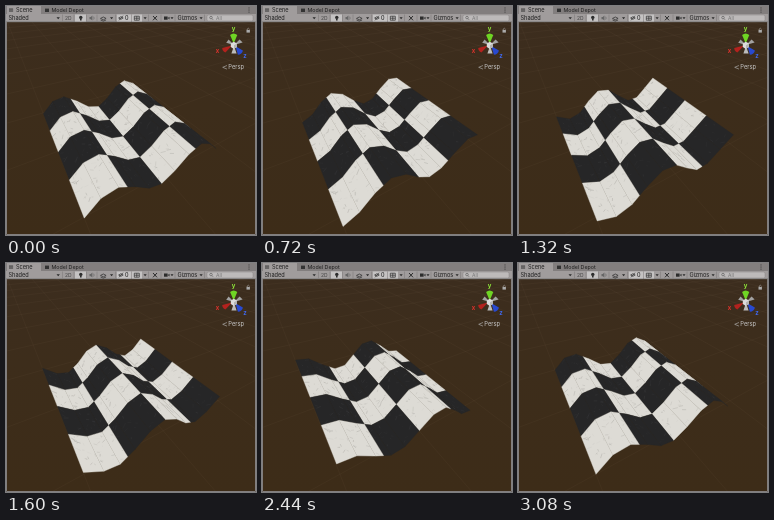
An HTML page with a canvas that plays this animation: 250 by 229 pixels, repeating every 3.12 s.

```html
<!DOCTYPE html>
<html lang="en">
<head>
<meta charset="utf-8">
<title>Scene view wave</title>
<style>
  html, body { margin: 0; width: 100%; height: 100%; overflow: hidden; background: #3d2d1a; }
  canvas, svg { position: absolute; left: 0; top: 0; width: 250px; height: 229px; display: block; }
  text { font: 5.6px Inter, Roboto, "Liberation Sans", sans-serif; fill: #1d1d1d; }
  .axis { font-weight: 700; font-size: 6px; text-anchor: middle; }
</style>
</head>
<body>
<canvas id="view"></canvas>
<svg viewBox="0 0 250 229">
  <!-- tabs -->
  <rect width="250" height="8" fill="#827e7e"/>
  <rect x="1" width="34" height="8" fill="#a09c9c"/>
  <path d="M4 2.2V6M6 2.2V6M3 3.1H7.2M3 5H7.2" stroke="#333" stroke-width=".6"/>
  <text x="10" y="6">Scene</text>
  <rect x="39" y="2.6" width="4" height="3.4" fill="#333"/>
  <text x="45.5" y="6" style="font-size:5.3px">Model Depot</text>
  <path d="M243 1.5v.9M243 3.6v.9M243 5.7v.9" stroke="#333"/>

  <!-- toolbar -->
  <rect y="8" width="250" height="8" fill="#a09c9c"/>
  <rect y="15.5" width="250" height=".7" fill="#777"/>
  <g fill="#c4c2c2">
    <rect x="69" y="8.5" width="11" height="7"/>
    <rect x="111" y="8.5" width="14" height="7"/>
    <rect x="126" y="8.5" width="10" height="7"/>
  </g>
  <path d="M56.5 8.5v7M68 8.5v7M80.5 8.5v7M91 8.5v7M109.5 8.5v7M142.5 8.5v7M155 8.5v7M169 8.5v7M198.5 8.5v7" stroke="#868282" stroke-width=".7"/>
  <text x="2.5" y="14">Shaded</text>
  <text x="59" y="14" style="font-size:5px;fill:#444">2D</text>
  <g fill="#2c2c2c">
    <path d="M50.5 11.3h3.4l-1.7 2zM104 11.3h3.2l-1.6 2zM137.5 11.3h3.2l-1.6 2zM164.5 11.3h3l-1.5 2zM193.5 11.3h3.2l-1.6 2z"/>
    <circle cx="74.8" cy="11.4" r="1.7"/>
    <rect x="74" y="13" width="1.6" height="1.5"/>
    <path d="M83.5 11h1.3l1.6-1.4v5l-1.6-1.4h-1.3z" fill="#666"/>
    <rect x="158" y="10.5" width="3.6" height="3.2"/>
    <path d="M161.8 12l1.7-1.3v2.8z"/>
  </g>
  <g fill="none" stroke="#2c2c2c" stroke-width=".7">
    <path d="M87.6 10.7q1 1.4 0 2.8" stroke="#666"/>
    <path d="M94.5 12.4l2.8-1.4 2.8 1.4-2.8 1.4zM94.5 14l2.8 1.1 2.8-1.1"/>
    <path d="M112.6 12q2.3-2.6 4.6 0-2.3 2.6-4.6 0zM113 14.3l4-4.6"/>
    <path d="M128.3 10.2h5v4h-5zM130.8 10.2v4M128.3 12.2h5"/>
    <path d="M147 10l4 4.3M151 10l-4 4.3" stroke-width="1"/>
  </g>
  <text x="119" y="14">0</text>
  <text x="171.5" y="14">Gizmos</text>
  <rect x="201" y="9" width="46" height="6" rx="1.5" fill="#bdbaba" stroke="#8a8686" stroke-width=".5"/>
  <g fill="none" stroke="#555" stroke-width=".6">
    <circle cx="205" cy="11.6" r="1.3"/><path d="M206 12.6l1.2 1.3"/>
  </g>
  <text x="210" y="14" style="font-size:5px;fill:#777">All</text>

  <!-- orientation gizmo -->
  <g fill="#a2a2a2">
    <path d="M228 39l5.6-5.6 3 3.2z"/>
    <path d="M228 39l-7.8-2.2 2.4-3.2z"/>
    <path d="M228 40l-2.6 7.6h5.2z" fill="#bcbcbc"/>
  </g>
  <path d="M227.7 37.5l-3.6-8.600q3.600-3 7.200 0z" fill="#6fd424"/>
  <path d="M226 39.600l-6.600 6.800q-3-1-3.200-4.400z" fill="#b3221e"/>
  <path d="M229.500 40.200l2.400 8.600q4.200-.6 5-4.400z" fill="#2849d0"/>
  <path d="M224.800 37.400l3-1.600 3.200 1.600v3.700l-3.200 1.800-3-1.800z" fill="#dcdcdc"/>
  <path d="M228 39.200l3-1.800v3.700l-3 1.800z" fill="#b5b5b5"/>
  <text class="axis" x="227.500" y="24.500" style="fill:#8fe63a">y</text>
  <text class="axis" x="211.500" y="46.500" style="fill:#d8332c">x</text>
  <text class="axis" x="239" y="51.500" style="fill:#3f68ee">z</text>
  <path d="M221 59.500l-4.300 1.800 4.300 1.800" fill="none" stroke="#bbb" stroke-width=".6"/>
  <text x="222.300" y="63.300" style="font-size:5.800px;fill:#c8c8c8">Persp</text>
  <rect x="240.500" y="24" width="3.400" height="2.600" fill="#aaa"/>
  <path d="M241.200 24v-1q1.100-1.600 2.200 0v.4" fill="none" stroke="#aaa" stroke-width=".6"/>

  <path d="M.5 16V228.500H249.500V16" fill="none" stroke="#827e7e"/>
</svg>
<script>
const LOOP = 3120, STEP = 40, W = 250, H = 229;
const canvas = document.getElementById('view');
const ctx = canvas.getContext('2d');
const ratio = window.devicePixelRatio || 1;
canvas.width = W * ratio;
canvas.height = H * ratio;
ctx.scale(ratio, ratio);
ctx.lineJoin = 'round';

let seed = 11;
function rand() {
  seed = (seed * 16807) % 2147483647;
  return seed / 2147483647;
}

// Camera space of a point; the sheet spans -5..5 in x and z.
function toCamera(x, y, z) {
  const right = 0.853 * x - 0.5225 * z;
  const ahead = 0.5225 * x + 0.853 * z;
  return [right - 0.72,
          0.12 - 0.0174 * right + 0.66 * ahead + 0.8 * y,
          14.448 + 0.777 * ahead - 0.629 * y];
}
function toScreen([x, y, depth]) {
  return [125.9 + 184 * x / depth, 122.5 - 184 * y / depth];
}

// u runs 0..10 across the sheet; the mesh has a vertex at each whole u
// and is straight in between.
function height(u, phase) {
  const i = Math.floor(u), k = u - i;
  const wave = n => Math.cos(n + 4.62 - phase);
  return wave(i) * (1 - k) + wave(i + 1) * k;
}

function groundLine(ax, az, bx, bz) {
  let a = toCamera(ax, 0, az), b = toCamera(bx, 0, bz);
  const near = 1;
  if (a[2] < near && b[2] < near) return;
  const cut = (p, q) => p.map((v, i) => v + (q[i] - v) * (near - p[2]) / (q[2] - p[2]));
  if (a[2] < near) a = cut(a, b);
  else if (b[2] < near) b = cut(b, a);
  ctx.moveTo(...toScreen(a));
  ctx.lineTo(...toScreen(b));
}

function drawGround() {
  const ground = ctx.createLinearGradient(0, 16, 0, H);
  ground.addColorStop(0, '#3c2d1e');
  ground.addColorStop(0.4, '#3d2d1b');
  ground.addColorStop(1, '#3d2c18');
  ctx.fillStyle = ground;
  ctx.fillRect(0, 0, W, H);
  ctx.strokeStyle = 'rgba(190,170,150,.06)';
  ctx.lineWidth = 0.7;
  ctx.beginPath();
  for (let n = -60; n <= 60; n += 5) {
    groundLine(n, -60, n, 60);
    groundLine(-60, n, 60, n);
  }
  ctx.stroke();
}

const cuts = [0, 1, 2, 2.5, 3, 4, 5, 6, 7, 7.5, 8, 9, 10];
const isDark = (u, v) => (Math.floor(u / 2.5) + Math.floor(v / 2.5)) % 2 === 0;

// Marble flecks, kept by strip so that nearer strips cover them.
const flecks = cuts.slice(1).map((end, i) => {
  const start = cuts[i], list = [];
  for (let n = 0; n < 60 * (end - start); n++) {
    const u = start + rand() * (end - start), v = rand() * 10;
    const u2 = u + (rand() - 0.4) * 0.5, v2 = v + (rand() - 0.5) * 0.5;
    const inside = u2 > start && u2 < end && Math.floor(v / 2.5) === Math.floor(v2 / 2.5);
    if (inside) list.push({ u, v, u2, v2, tone: rand(), dark: isDark(u, v) });
  }
  return list;
});

function drawSheet(phase) {
  const at = (u, v) => toScreen(toCamera(u - 5, height(u, phase), 5 - v));
  for (let i = cuts.length - 2; i >= 0; i--) {
    const a = cuts[i], b = cuts[i + 1];
    for (let v = 0; v < 10; v += 2.5) {
      ctx.fillStyle = ctx.strokeStyle = isDark(a, v) ? '#262627' : '#dddbd5';
      ctx.lineWidth = 0.35;
      ctx.beginPath();
      [[a, v], [b, v], [b, v + 2.5], [a, v + 2.5]].forEach(p => ctx.lineTo(...at(...p)));
      ctx.closePath();
      ctx.fill();
      ctx.stroke();
    }
    ctx.lineWidth = 0.8;
    for (const f of flecks[i]) {
      ctx.strokeStyle = f.dark ? `rgba(120,120,125,${0.14 * f.tone})` : `rgba(95,92,88,${0.26 * f.tone})`;
      ctx.beginPath();
      ctx.moveTo(...at(f.u, f.v));
      ctx.lineTo(...at(f.u2, f.v2));
      ctx.stroke();
    }
  }
}

function frame() {
  const time = Math.floor((performance.now() % LOOP) / STEP) * STEP;
  drawGround();
  drawSheet(time / LOOP * 2 * Math.PI);
  requestAnimationFrame(frame);
}
frame();
</script>
</body>
</html>
```
